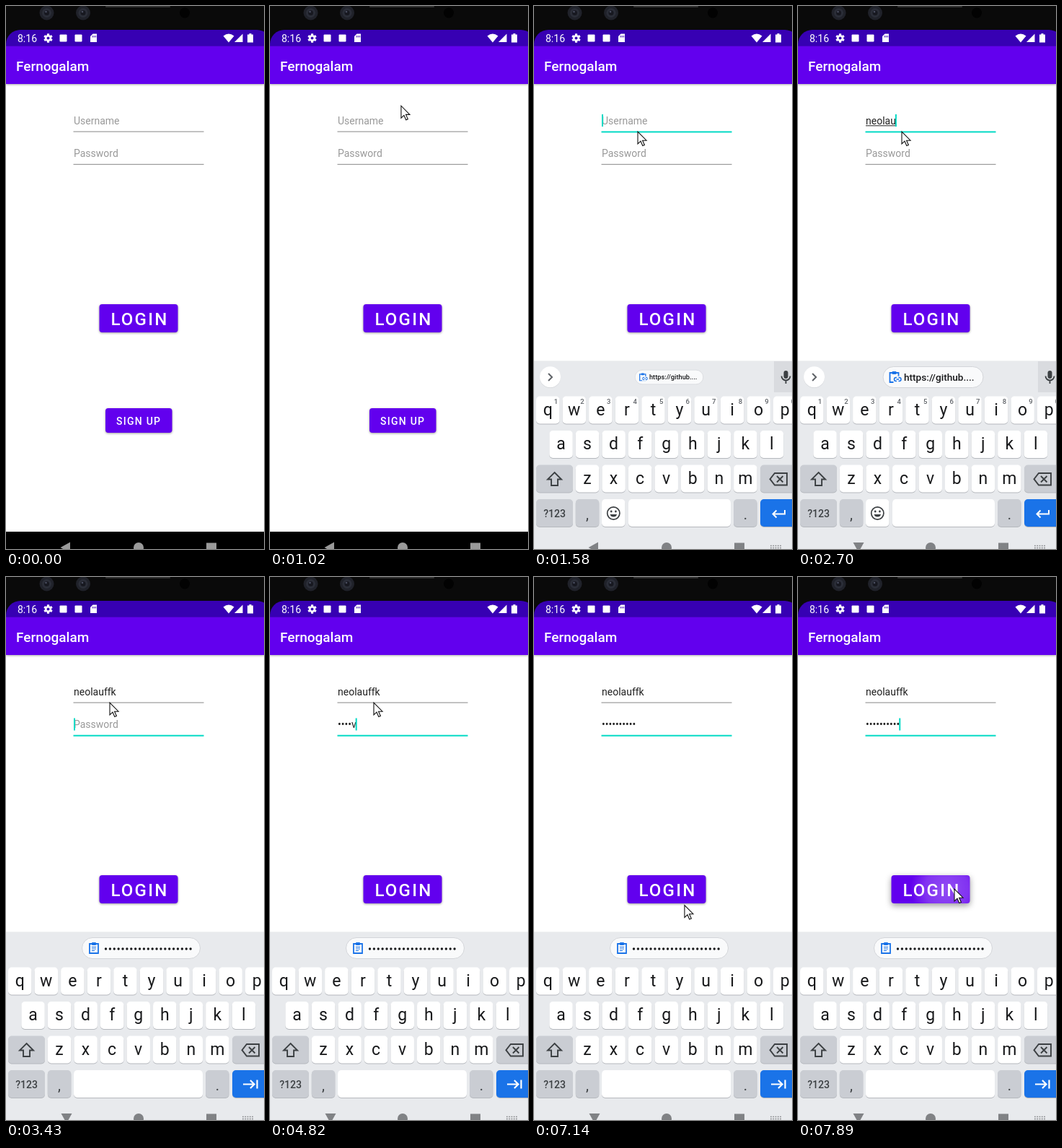
Recreate the animation shown at these times as an HTML page. Size 358 px wide and 752 px high, loop 8000 ms.

```html
<!DOCTYPE html>
<html lang="en">
<head>
<meta charset="utf-8">
<title>Login</title>
<style>
html, body { margin: 0; width: 100%; height: 100%; overflow: hidden; background: #fff; }
svg { display: block; width: 358px; height: 752px; }
text { font-family: Roboto, sans-serif; white-space: pre; }
.med { font-weight: 500; }
.mid { text-anchor: middle; }
.line { fill: none; stroke-linejoin: miter; }
</style>
</head>
<body>
<svg id="stage" viewBox="0 0 358 752" xmlns="http://www.w3.org/2000/svg"></svg>
<script>
const LOOP = 8000, STEP = 66.6;
const USER = 'neolauffk', PASS = 'ktuivpm123';
const USER_AT = [2170, 2280, 2390, 2490, 2590, 2700, 2900, 3030, 3100];
const PASS_AT = [4090, 4200, 4310, 4420, 4820, 4950, 5040, 5130, 5220, 5300];
const FOCUS = 1230, NEXT = 3300, CHIP = 3430, MASK = 6800, PRESS = 7610;

// Rows of [time, values...]
const POINTER = [
  [240, 311, 684], [440, 270, 560], [640, 205, 390], [770, 172, 265],
  [880, 167, 190], [973, 182, 138], [1090, 178, 156], [1305, 178, 158],
  [1372, 166, 164], [1439, 152, 171], [1505, 147, 173], [1572, 144, 174],
  [5760, 144, 174], [5840, 170, 188], [5910, 200, 206], [5980, 218, 214],
  [6050, 212, 236], [6120, 198, 258], [6210, 189, 305], [6290, 190, 335],
  [6380, 190, 335], [6520, 192, 351], [6590, 193, 362], [6790, 195, 410],
  [6990, 203, 452], [7120, 210, 455], [7330, 217, 432]
];
const BOARD = [
  [1238, 260, 0], [1305, 235, .12], [1372, 170, .4],
  [1439, 88, .72], [1505, 30, .93], [1572, 0, 1]
];
const GROW = [[1372, 0], [1439, .16], [1572, .68], [1705, .93], [1772, 1]];
const TURN = [[1572, 0], [1705, -60], [1772, -90]];
const RIPPLE = [[PRESS, 8, .35], [7750, 30, .8], [7880, 50, 1]];

const rect = (x, y, w, h, fill, r = 0, more = '') =>
  `<rect x="${x}" y="${y}" width="${w}" height="${h}" rx="${r}" fill="${fill}" ${more}/>`;
const text = (x, y, size, fill, str, more = '') =>
  `<text x="${x}" y="${y}" font-size="${size}" fill="${fill}" ${more}>${str}</text>`;
const path = (d, fill, more = '') => `<path d="${d}" fill="${fill}" ${more}/>`;
const line = (d, color, w = 2, more = '') =>
  `<path class="line" d="${d}" stroke="${color}" stroke-width="${w}" ${more}/>`;
const circle = (x, y, r, fill, more = '') =>
  `<circle cx="${x}" cy="${y}" r="${r}" fill="${fill}" ${more}/>`;

const WHITE = '#fff', GREY = '#cacdd3', INK = '#18191b', ICON = '#3c4043',
  BLUE = '#1a73e8', PURPLE = '#6200ee', TEAL = '#03dac5';

const key = (x, y, w, fill = WHITE) =>
  rect(x, y + 1, w, 38, '#b5b8bd', 5) + rect(x, y, w, 38, fill, 5);

function letters(str, x, y, base) {
  return [...str].map((c, i) => {
    const left = x + i * 36.55;
    return key(left, y, 32.5) + text(left + 16.2, base, 23, INK, c, 'class="mid"');
  }).join('');
}

function lens(x) {
  return circle(x, 9.5, 10, '#20222a') + circle(x, 9.5, 6.5, '#2b2e38') +
    circle(x, 9.5, 3.5, '#171820') + circle(x - 1, 8, 1.3, '#4a4e60');
}

function gear(x, y) {
  let teeth = '';
  for (let a = 0; a < 360; a += 60) teeth += rect(x - 1.6, y - 6.2, 3.2, 4, WHITE, .5, `transform="rotate(${a} ${x} ${y})"`);
  return teeth + circle(x, y, 3.3, 'none', 'stroke="#fff" stroke-width="2.6"');
}

function statusBar() {
  return rect(0, 0, 358, 56, '#0a0a0a') + rect(138, 0, 90, 2, '#303030', 1) +
    lens(56.5) + lens(107) + circle(248, 9.5, 7, '#020202') +
    path('M0 56V53A20 20 0 0 1 20 33H348A20 20 0 0 1 368 53V56Z', '#3700b3') +
    text(16, 49.5, 14, WHITE, '8:16') + gear(58.5, 44.5) +
    rect(74.5, 39.5, 10, 10, WHITE, 1) + rect(95.5, 39.5, 10, 10, WHITE, 1) +
    path('M120.5 38.5H126V50H117V42Z', WHITE) +
    line('M120.5 41V43.5M122.5 41V43.5M124.5 41V43.5', '#3700b3', .9) +
    path('M301.5 41.5Q309 35.5 316.5 41.5L309 50.5Z', WHITE) +
    path('M328.5 38.5V50H317Z', WHITE) +
    path('M337.5 38H340.5V39.5H343V50.5H335V39.5H337.5Z', WHITE);
}

function fields() {
  return text(94, 164, 14, '#999', 'Username', 'id="userHint"') +
    text(94, 164, 14, '#212121', '', 'id="user"') +
    rect(94, 165.3, 0, 1, '#212121', 0, 'id="composing"') +
    rect(93.5, 173.5, 181, 1, '#858585', 0, 'id="userLine"') +
    text(94, 209, 14, '#999', 'Password', 'id="passHint"') +
    text(94, 209, 14, '#212121', '', 'id="pass"') +
    rect(93.5, 218.8, 181, 1, '#858585', 0, 'id="passLine"') +
    rect(94, 150, 2, 17, TEAL, 0, 'id="caret"');
}

function buttons() {
  return rect(129.5, 413, 109, 39, PURPLE, 4, 'id="login"') +
    `<g clip-path="url(#loginClip)">${circle(206, 432, 0, 'url(#glow)', 'id="ripple"')}</g>` +
    text(145.4, 442, 24, WHITE, 'LOGIN', 'class="med" letter-spacing="2.2"') +
    rect(138, 557, 92.5, 34, PURPLE, 4, 'style="filter:drop-shadow(0 1.5px 1.5px #0006)"') +
    text(153, 580, 14, WHITE, 'SIGN UP', 'class="med" letter-spacing="1.25"');
}

function chip(x, w, body) {
  return rect(x, 499.5, w, 29, '#f9fafb', 14.5, 'stroke="#d3d5d9"') + body;
}

const clipboard = x =>
  line(`M${x - 6} 508H${x + 6}V521H${x - 6}Z`, BLUE, 1.8) +
  rect(x - 3, 506, 6, 4, BLUE, 1);

function textStrip() {
  const link = rect(132.5, 512.5, 11, 9.5, '#f9fafb') +
    line('M137 514.5H136A2.5 2.5 0 0 0 136 519.5H137M139.5 514.5H140.5A2.5 2.5 0 0 1 140.5 519.5H139.5M136.5 517H140', BLUE, 1.5);
  return circle(22.5, 514.5, 14.5, '#d2d4d8') + circle(22.5, 513.8, 14.5, WHITE) +
    line('M20 509L25 514L20 519', '#5f6368', 2) +
    rect(333, 492, 25, 43, '#d9dbdf') +
    rect(346.5, 505, 6, 11, ICON, 3) +
    line('M343.5 512.5A6 6 0 0 0 355.5 512.5M349.5 518.5V523', ICON, 1.8) +
    `<g id="chip">${chip(118, 139, clipboard(133.5) + link +
      text(147, 519, 13.6, INK, 'https://github....', 'class="med"'))}</g>`;
}

function secretStrip() {
  return chip(105.5, 164, clipboard(122) +
    line('M119 512.5H125M119 515H125M119 517.5H123', BLUE, 1.2) +
    line('M138.5 515H256.5', INK, 3.4, 'stroke-linecap="round" stroke-dasharray="0 5.88"'));
}

function textKeys() {
  const digits = [...'1234567890'].map((d, i) =>
    text(30.5 + i * 36.55, 551, 9.5, '#5f6368', d, 'class="mid med"')).join('');
  return digits + key(94, 683, 32.5) + key(131, 683, 142) +
    circle(110.3, 702.5, 8.6, 'none', `stroke="${ICON}" stroke-width="1.7"`) +
    circle(107.2, 700, 1.4, ICON) + circle(113.4, 700, 1.4, ICON) +
    path('M105.5 704H115.1A5 5 0 0 1 105.5 704Z', ICON) +
    line('M348 698V703.5H331.5M336.5 698.5L331.5 703.5L336.5 708.5', WHITE, 2);
}

function secretKeys() {
  return key(94, 683, 179) +
    line('M329 702.5H344M339 697L344.5 702.5L339 708M348.5 696.5V708.5', WHITE, 2.2);
}

function keyboard() {
  return rect(0, 491, 358, 1, '#f1f2f3') + rect(0, 492, 358, 520, '#e8eaed') +
    letters('qwertyuiop', 3, 540.5, 567) +
    letters('asdfghjkl', 21.3, 588, 614) +
    letters('zxcvbnm', 57.8, 635.5, 661.5) +
    key(3, 635.5, 51, GREY) + key(314, 635.5, 51, GREY) +
    line('M28.5 646L38 655.5H33V664H24V655.5H19Z', ICON, 1.9) +
    line('M334 647H351V663.5H334L327.5 655.2Z', ICON, 1.9) +
    line('M337 651L345.5 659.5M345.5 651L337 659.5', ICON, 1.9) +
    key(3, 683, 51, GREY) + text(28.5, 707.5, 14, ICON, '?123', 'class="mid med"') +
    key(57.8, 683, 32.5, GREY) + text(74, 711, 20, ICON, ',', 'class="mid"') +
    key(277, 683, 32.5, GREY) + text(293.3, 711, 20, ICON, '.', 'class="mid"') +
    key(314, 683, 51, BLUE) +
    `<g id="textKeys">${textKeys()}</g><g id="textStrip">${textStrip()}</g>` +
    `<g id="secretKeys">${secretKeys()}</g><g id="secretStrip">${secretStrip()}</g>`;
}

function navIcons() {
  return path('M75.5 750L89 742.5V757.5Z', 'inherit', 'id="back"').replace('fill="inherit"', '') +
    '<circle cx="184" cy="750" r="7"/><rect x="278" y="743.5" width="14" height="14"/>' +
    line('M328 747.5H343M328 750.5H343', '#8a8c8f', 1.6, 'id="switcher" stroke-dasharray="1.8 1.5"');
}

const stage = document.getElementById('stage');
stage.innerHTML =
  `<defs>
    <clipPath id="loginClip">${rect(129.5, 413, 109, 39, WHITE, 4)}</clipPath>
    <radialGradient id="glow">
      <stop offset="0" stop-color="#fff" stop-opacity=".3"/>
      <stop offset=".6" stop-color="#fff" stop-opacity=".2"/>
      <stop offset="1" stop-color="#fff" stop-opacity="0"/>
    </radialGradient>
  </defs>` +
  rect(0, 0, 358, 752, WHITE) + statusBar() +
  rect(0, 56, 358, 52, PURPLE, 0, 'style="filter:drop-shadow(0 1px 1.5px #0005)"') +
  rect(0, 55.5, 358, 1, PURPLE) +
  text(14, 90, 19, WHITE, 'Fernogalam', 'class="med"') +
  fields() + buttons() +
  rect(0, 728, 358, 24, '#000') +
  `<g id="board">${keyboard()}</g><g id="nav">${navIcons()}</g>` +
  path('M0 0V17L4 13.2L6.8 19.5L9.4 18.4L6.6 12.2H12Z', WHITE, 'id="pointer" stroke="#111" stroke-width="1.1"');

const ui = {};
stage.querySelectorAll('[id]').forEach(el => ui[el.id] = el);

function set(el, attrs) {
  for (const k in attrs) el.setAttribute(k, attrs[k]);
}
const show = (el, on) => set(el, { visibility: on ? 'visible' : 'hidden' });
const count = (times, t) => times.filter(x => t >= x).length;
const within = (t, a, b) => t >= a && t < b;

function at(keys, t) {
  let i = keys.findIndex(k => k[0] > t);
  if (i < 0) i = keys.length;
  if (i === 0 || i === keys.length) return keys[Math.max(i - 1, 0)].slice(1);
  const a = keys[i - 1], b = keys[i], p = (t - a[0]) / (b[0] - a[0]);
  return a.slice(1).map((v, j) => v + (b[j + 1] - v) * p);
}

function underline(el, y, on) {
  set(el, { y: on ? y - .1 : y, height: on ? 2 : 1, fill: on ? TEAL : '#858585' });
}

function drawFields(t) {
  const typed = count(USER_AT, t), hidden = count(PASS_AT, t);
  const onUser = within(t, FOCUS, NEXT), onPass = t >= NEXT;
  ui.user.textContent = USER.slice(0, typed);
  const last = t < MASK ? PASS.slice(hidden - 1, hidden) : '•';
  ui.pass.textContent = hidden ? '•'.repeat(hidden - 1) + last : '';
  show(ui.userHint, !typed);
  show(ui.passHint, !hidden);
  underline(ui.userLine, 173.5, onUser);
  underline(ui.passLine, 218.8, onPass);

  const width = typed ? ui.user.getComputedTextLength() : 0;
  set(ui.composing, { width: onUser ? width : 0 });
  const end = onPass ? (hidden ? ui.pass.getComputedTextLength() : 0) : width;
  const blink = within(t, 3830, 4090) || within(t, 5800, 6300) || within(t, 6800, 7300);
  set(ui.caret, { x: 94 + Math.max(0, end - 1), y: onPass ? 195.5 : 150 });
  show(ui.caret, (onUser || onPass) && !blink);
}

function drawKeyboard(t) {
  const [drop, alpha] = at(BOARD, t), [size] = at(GROW, t), [turn] = at(TURN, t);
  set(ui.board, { transform: `translate(0 ${drop})`, opacity: alpha });
  set(ui.chip, { transform: `translate(187.5 514) scale(${size}) translate(-187.5 -514)` });
  set(ui.back, { transform: `rotate(${turn} 83 749)` });
  set(ui.nav, { fill: alpha > .5 ? '#808285' : '#9a9a9a' });
  show(ui.switcher, t >= 1570);
}

function draw(now) {
  const t = now % LOOP;
  const q = 240 + Math.floor((t - 240) / STEP) * STEP;
  drawFields(t);
  drawKeyboard(q);
  for (const id of ['textKeys', 'textStrip']) show(ui[id], t < NEXT);
  show(ui.secretKeys, t >= NEXT);
  show(ui.secretStrip, t >= CHIP);

  const [x, y] = at(POINTER, q);
  set(ui.pointer, { transform: `translate(${x} ${y})` });
  show(ui.pointer, t >= 240);

  const [r, glow] = at(RIPPLE, t);
  const lift = t < PRESS ? 0 : Math.min(1, (t - PRESS) / 200);
  set(ui.ripple, { r: t < PRESS ? 0 : r, opacity: glow });
  ui.login.style.filter = `drop-shadow(0 ${1.5 + lift * 2}px ${1.5 + lift * 2.5}px #0006)`;
}

function loop() {
  draw(performance.now());
  requestAnimationFrame(loop);
}
loop();
</script>
</body>
</html>
```
